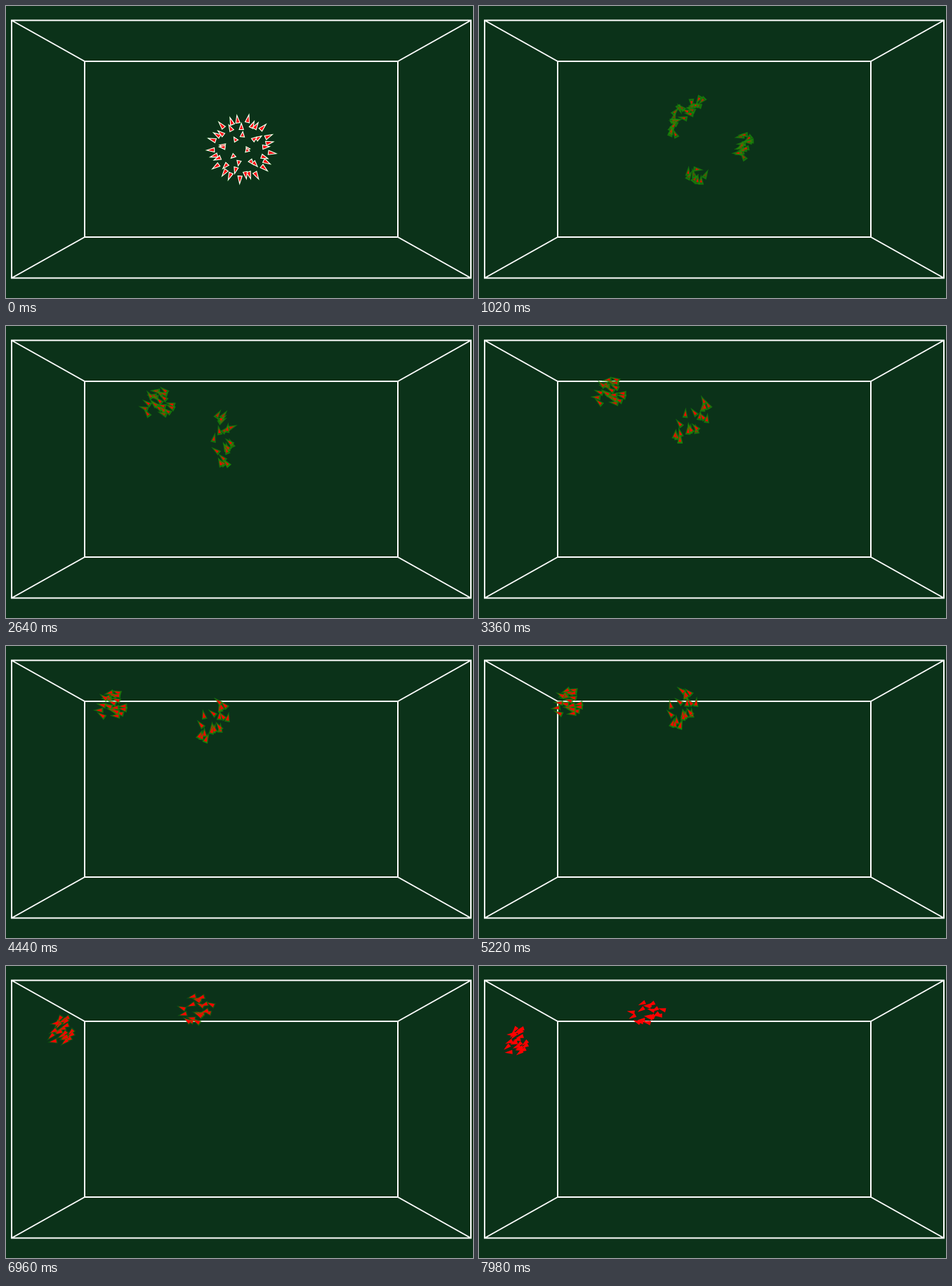
An HTML page with a canvas that plays this animation: 665x417 px, repeating every 8000 ms.

```html
<!DOCTYPE html>
<html lang="en">
<head>
<meta charset="utf-8">
<title>Flock in a box</title>
<style>
  html, body { margin: 0; width: 100%; height: 100%; overflow: hidden; background: #0b3219; }
  canvas { display: block; }
</style>
</head>
<body>
<canvas id="stage" width="665" height="417"></canvas>
<script>
const ctx = document.getElementById('stage').getContext('2d');
const LOOP = 8000, STEP = 60, COUNT = 43;
const RAD = Math.PI / 180, GOLDEN = Math.PI * (3 - Math.sqrt(5));

const mix = (a, b, k) => a + (b - a) * k;
const ramp = (a, b, t) => Math.min(1, Math.max(0, (t - a) / (b - a)));
const ease = (a, b, t) => { const k = ramp(a, b, t); return k * k * (3 - 2 * k); };
const noise = n => { const v = Math.sin(n * 127.1 + 3.7) * 43758.5453; return v - Math.floor(v); };

// Each flock follows a few key points (time, x, y) and spreads over a tilted ellipse.
const leftFlock = {
  path: [[800, 300, 160], [1980, 250, 129], [3360, 189, 95], [5880, 110, 82], [7980, 55, 109]],
  spread: t => ({ along: mix(28, 18, ramp(2000, 8000, t)), across: 19, tilt: 0 })
};
const rightFlock = {
  path: [[800, 335, 205], [1980, 317, 187], [3360, 303, 137], [5880, 284, 76], [6900, 272, 63], [7980, 238, 68]],
  spread: t => ({
    along: mix(40, 14, ramp(2000, 8000, t)),
    across: mix(14, 25, ramp(2000, 8000, t)),
    tilt: mix(0.75, 2.2, ease(1900, 3400, t)) - 0.6 * ease(3400, 6000, t)
  })
};

// The burst first thins out towards three directions, then forms the two flocks.
function chooseGroup(angle) {
  if (Math.cos(angle + 135 * RAD) > Math.cos(95 * RAD)) return { flock: leftFlock, gather: -135 * RAD };
  return { flock: rightFlock, gather: (angle > 60 * RAD ? 122 : 8) * RAD };
}

// Starting places lie evenly on a sphere seen from the front.
const boids = Array.from({ length: COUNT }, (_, i) => {
  const depth = 1 - 2 * (i + 0.5) / COUNT;
  const angle = Math.atan2(Math.sin(i * GOLDEN), Math.cos(i * GOLDEN));
  const { flock, gather } = chooseGroup(angle);
  const swing = Math.atan2(Math.sin(angle - gather), Math.cos(angle - gather));
  return {
    angle, swing, flock,
    rim: Math.sqrt(1 - depth * depth),
    ringRadius: mix(46, 64, noise(i)),
    seatAngle: noise(i + 100) * 2 * Math.PI,
    seatRadius: Math.sqrt(noise(i + 200)) * 1.05,
    wobble: noise(i + 300) - 0.5,
    redness: mix(0.3, 1, noise(i + 400))
  };
});

// Cubic curve through unevenly timed key points.
function follow(keys, t) {
  let i = 0;
  while (i < keys.length - 2 && t > keys[i + 1][0]) i++;
  const a = keys[i], b = keys[i + 1], span = b[0] - a[0];
  const before = keys[i - 1] || a, after = keys[i + 2] || b;
  const k = (t - a[0]) / span, k2 = k * k, k3 = k2 * k;
  return [1, 2].map(n => {
    const ma = (b[n] - before[n]) / (b[0] - before[0]) * span;
    const mb = (after[n] - a[n]) / (after[0] - a[0]) * span;
    return (2 * k3 - 3 * k2 + 1) * a[n] + (k3 - 2 * k2 + k) * ma
         + (3 * k2 - 2 * k3) * b[n] + (k3 - k2) * mb;
  });
}

function burstPosition(boid, t) {
  const angle = boid.angle - boid.swing * 0.6 * ease(100, 1020, t);
  const radius = mix(boid.rim * 44, boid.ringRadius, ease(-200, 700, t) * ramp(0, 300, t));
  const drift = ease(300, 1020, t);
  return [mix(335, 328, drift) + radius * Math.cos(angle), mix(204, 192, drift) + radius * Math.sin(angle)];
}

function flockPosition(boid, t) {
  const [x, y] = follow(boid.flock.path, Math.max(800, t));
  const { along, across, tilt } = boid.flock.spread(t);
  const u = along * boid.seatRadius * Math.cos(boid.seatAngle);
  const v = across * boid.seatRadius * Math.sin(boid.seatAngle);
  return [x + u * Math.cos(tilt) - v * Math.sin(tilt), y + u * Math.sin(tilt) + v * Math.cos(tilt)];
}

function positionAt(boid, t) {
  const burst = burstPosition(boid, t), flock = flockPosition(boid, t);
  const joined = ease(850, 2050, t);
  return [mix(burst[0], flock[0], joined), mix(burst[1], flock[1], joined)];
}

function drawBox() {
  ctx.fillStyle = '#0b3219';
  ctx.fillRect(0, 0, 665, 417);
  ctx.strokeStyle = '#fff';
  ctx.lineWidth = 2;
  ctx.beginPath();
  ctx.rect(8, 20.5, 654, 368);
  ctx.rect(112, 79, 446, 251);
  for (const [x1, x2] of [[8, 112], [662, 558]]) {
    for (const [y1, y2] of [[20.5, 79], [388.5, 330]]) {
      ctx.moveTo(x1, y1);
      ctx.lineTo(x2, y2);
    }
  }
  ctx.stroke();
}

function dart(length, half) {
  ctx.beginPath();
  ctx.moveTo(length * 0.55, 0);
  ctx.lineTo(-length * 0.45, half);
  ctx.lineTo(-length * 0.45, -half);
  ctx.closePath();
}

function drawBoid(boid, t) {
  const [x, y] = positionAt(boid, t);
  const [x1, y1] = positionAt(boid, t - 30);
  const [x2, y2] = positionAt(boid, t + 30);
  const turn = ramp(300, 900, t);
  const course = Math.atan2(y2 - y1, x2 - x1) + boid.wobble;
  const heading = Math.atan2(
    mix(Math.sin(boid.angle), Math.sin(course), turn),
    mix(Math.cos(boid.angle), Math.cos(course), turn));
  const length = mix(4 + 7 * boid.rim, 11, turn);
  const white = 1 - ramp(60, 700, t);
  const solid = ramp(6200, 7900, t);
  const core = mix(mix(0.5, 0.75, ramp(1000, 4400, t)), 1, Math.max(white, solid));
  const red = mix(mix(boid.redness, 1, ramp(1500, 4400, t)), 1, white);

  ctx.save();
  ctx.translate(x, y);
  ctx.rotate(heading);
  dart(length, 3);
  ctx.lineWidth = 1.6;
  ctx.strokeStyle = ctx.fillStyle = `rgba(28,140,8,${0.6 * (1 - solid)})`;
  ctx.stroke();
  ctx.fill();
  dart(length * core, 3 * core);
  ctx.fillStyle = `rgba(255,0,0,${red})`;
  ctx.fill();
  dart(length, 3);
  ctx.lineWidth = 1.1;
  ctx.strokeStyle = `rgba(255,255,255,${white})`;
  ctx.stroke();
  ctx.restore();
}

function frame(now) {
  const t = Math.floor((now % LOOP) / STEP) * STEP;
  drawBox();
  boids.forEach(boid => drawBoid(boid, t));
  requestAnimationFrame(frame);
}
requestAnimationFrame(frame);
</script>
</body>
</html>
```
